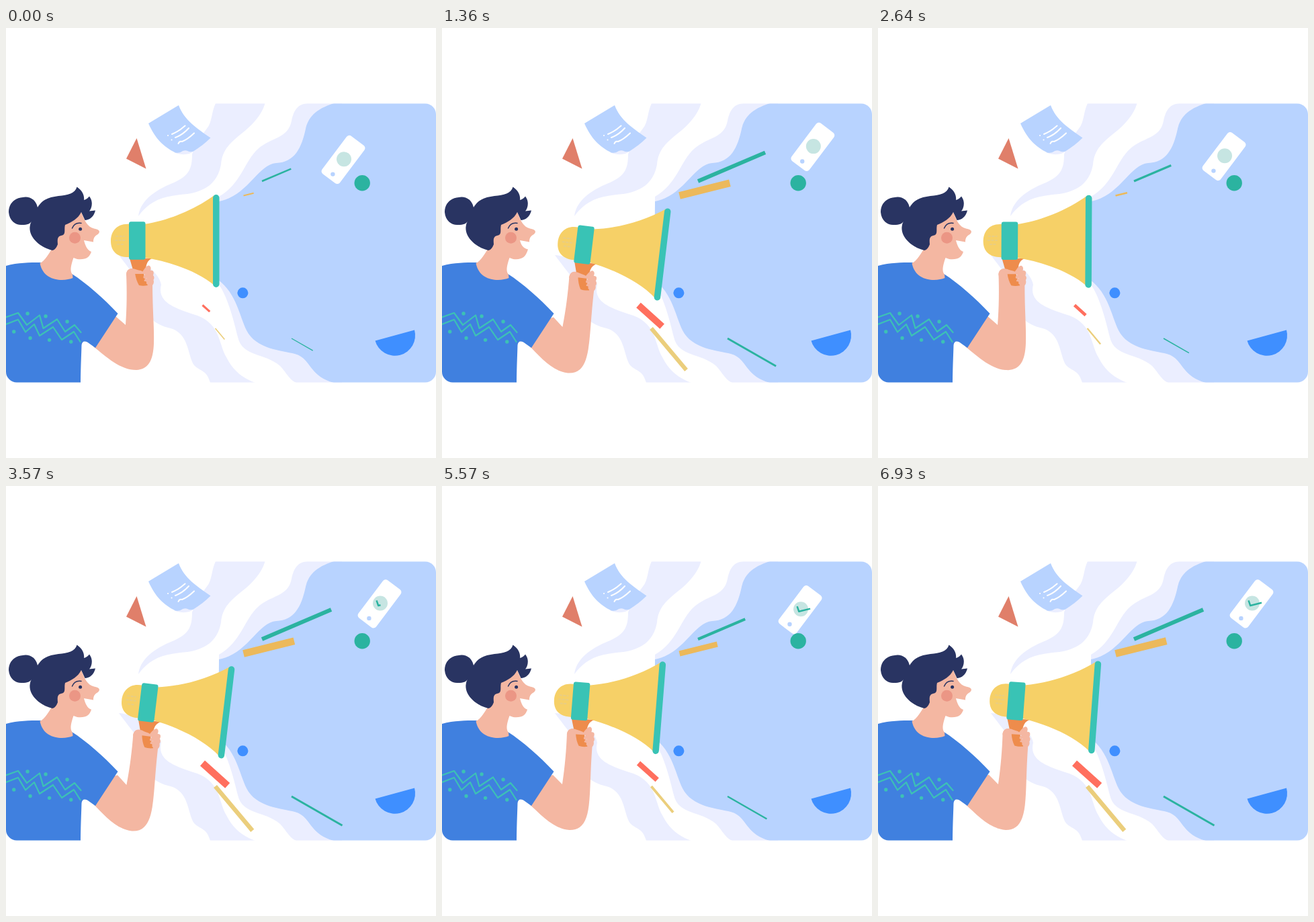
Recreate the animation shown at these times as an HTML page. Size 640 by 640 pixels, loop 7000 ms.

```html
<!DOCTYPE html>
<html lang="en">
<head>
<meta charset="utf-8">
<title>Announcement</title>
<style>
html, body { margin: 0; width: 100%; height: 100%; overflow: hidden; background: #fff; }
svg { display: block; width: 100vw; height: 100vh; }
.sky { fill: #b8d3ff; }
.mist { fill: #ebeeff; }
.skin { fill: #f4b7a2; }
.navy { fill: #293462; }
.teal { fill: #2bb3a0; }
.mint { fill: #39c3b5; }
.gold { fill: #f6d067; }
.grip { fill: #ee8c4c; }
.blue { fill: #3f8fff; }
.line { fill: none; stroke-linecap: round; stroke-linejoin: round; }
</style>
</head>
<body>
<svg viewBox="0 0 640 640">
  <clipPath id="card"><rect y="112.5" width="640" height="415" rx="16"/></clipPath>
  <g clip-path="url(#card)">
    <!-- sound waves -->
    <g class="mist">
      <path d="M312 112H385.5C383 122 375 138 352 156C335 170 322 180 320 203C315 232 295 243 270 247C240 250 218 252 197 280C200 255 225 240 250 230C272 220 277 210 277 188C285 165 296 155 302 145C307 135 306 125 312 112Z"/>
      <path d="M168 338C195 340 228 362 231 382C224 410 255 418 285 428C320 442 316 470 328 490C338 510 352 521 371 528H304C298 508 290 512 280 502C270 488 273 455 245 447C232 444 222 439 216 432C222 400 195 375 168 338Z"/>
      <path d="M448 112C432 114 428 125 425 138C420 165 395 162 375 180C355 198 350 232 317 251V382C331 402 340 440 345 460C352 490 385 483 408 503C418 514 422 524 432 528H500V112Z"/>
    </g>
    <path class="sky" d="M488 112C460 121 450 133 446 150C440 178 430 200 402 201C375 203 360 250 317 258L316 375C343 395 348 430 358 450C372 478 410 480 430 485C455 492 450 518 488 528H640V112Z"/>

    <!-- loose shapes -->
    <path class="mist" d="M250 185C262 190 272 189 280 183L262 180Z"/>
    <path class="sky" d="M212 142L257 115C265 137 285 150 304.5 163.5C297 171 288 178 279 183.5C271 186 270 180 263 183C259 186 256 186 252 185.5C235 177 222 165 212 142Z"/>
    <path class="line" stroke="#fff" stroke-width="2" d="M247 158Q257 154 266.5 145.5M252 163Q263 159 272 149M256.500 172Q258 168 262 169Q270 166 280 156.500M241 160h.1M246.500 166.500h.1"/>
    <path fill="#e07f6a" d="M194.500 164L179 194.500L208.500 209.500Z"/>
    <circle class="teal" cx="530.2" cy="230.700" r="11.700"/>
    <circle class="blue" cx="352.400" cy="394.300" r="8"/>
    <path class="blue" d="M549.500 465.500L608 449.500A30.300 30.300 0 0 1 549.500 465.500Z"/>
    <g id="streaks"></g>

    <g id="phone">
      <rect x="-16.500" y="-35.300" width="33" height="70.600" rx="5" fill="#fff" transform="rotate(37)"/>
      <circle cx="1" cy="-.8" r="11" fill="#c6e5e2"/>
      <circle cx="-15.600" cy="21.600" r="3.200" class="sky"/>
      <path id="tick" class="line" style="stroke-linecap:butt" stroke="#2bb3a0" stroke-width="2.500" pathLength="24" d="M-4.500 -5L-1.800 2.700L15 -1.500"/>
    </g>

    <!-- raised arm and megaphone -->
    <g id="arm">
      <path class="skin" d="M138 440L163 429L178 442C180 415 180 390 179 366C180 358 187 357 192 359L218 380C218 420 221 450 220 470C219 495 212 508 194 509C170 509 150 490 130 474Z"/>
      <path class="grip" d="M184 343L218 342.500C210 346 209 352 208 358L205 364L206 372L211 383C206 384 202 384 198 383C195 378 193 372 192 365L189 360Z"/>
      <path class="skin" d="M179 368C179 357 188 357 194 359.500C201 361.500 205 361 204 366L192 366L190 374Z"/>
      <path class="skin" d="M202 365C204 361 209 353 213 353.500C216 355 216 358 215 361C219 360 221 363 219 368C221 370 221 373 219.500 375C221 379 219 384 215 384L209 380.500Q208 379 212 377L206 377Q204 375 210 372L205 372.500Q203 370 207 367Z"/>
      <path class="gold" d="M185 292C165 290 156 303 156 317C156 333 166 342 185 341Z"/>
      <path class="line" stroke="#e8cd84" stroke-width="2" stroke-dasharray="2.500 3" d="M164 310H176M163 316H177M166 322H177"/>
      <path class="gold" d="M206 292C240 287 280 271 310 249V383C285 362 245 348 206 341.500Z"/>
      <rect class="mint" x="183" y="288.300" width="24.500" height="56.500" rx="3"/>
      <rect class="mint" x="308" y="248" width="9.500" height="138" rx="4.700"/>
    </g>

    <!-- speaker -->
    <path fill="#4080df" d="M0 354C18 349 35 349 51 349L98 366C120 380 145 402 166.500 425L133 476L121 467.500C116 465 113 467 112.500 472C112 490 111 510 111 528H0Z"/>
    <g stroke="#3cc1b5" stroke-width="2.200" class="line">
      <path d="M0 430.500L18 424L31 442L50 427.500L55.500 447L76 433.500L88 452L102 442L111.500 453"/>
      <path d="M0 441L18 434L29 452.500L42 441L50 458L70 445L83 464L101 452L110.500 467"/>
      <path stroke-width="5.300" d="M32 425h.1M59 429h.1M91 437h.1M11.700 452h.1M36 461.500h.1M64.500 464.300h.1M96.700 467h.1"/>
    </g>
    <path id="face" class="skin"/>
    <circle cx="102.500" cy="312.300" r="8.500" fill="#eb9685"/>
    <circle class="navy" cx="110.600" cy="299.300" r="2.500"/>
    <path class="line" stroke="#293462" stroke-width="1.500" d="M98.500 298C101 292 106 289.500 112 290.500"/>
    <path class="navy" d="M47 267C44 253 32 250 25 252C12 253 4 262 4 274C5 288 16 294 24 293C32 293 36 291 38 288C36 291 36 293 35.500 296C34 312 50 326 69 331C73 330 75 327 77 322C77 319 75 310 82 309C90 308 86 300 88 293C98 289 107 284 112 274L117.500 286C124 286 131 281 133 271.500L124 272.500C128 268 130 258 124 250.500C123 252 120 255 116 256C117 250 114 242 105.500 236.500C103 246 92 249 78 250C65 252 55 254 47 267Z"/>
  </g>
</svg>
<script>
const LOOP = 7000;
const $ = id => document.getElementById(id);
const clamp = v => Math.min(1, Math.max(0, v));

// Each start time begins a smooth swing to the opposite end (0 -> 1 -> 0 ...).
const swing = (t, starts, length = 1120) => starts.reduce((v, start, i) => {
  const p = (1 - Math.cos(Math.PI * clamp((t - start) / length))) / 2;
  return v + (i % 2 ? -p : p);
}, 0);

const streaks = [
  { x: 381, y: 228, angle: -23.1, len: 112, width: 6, min: .42, color: '#2bb3a0', starts: [40, 1200, 2310, 3594, 5046] },
  { x: 353.5, y: 249.5, angle: -14, len: 78, width: 11, min: .2, color: '#ecb95b', starts: [40, 1280, 2500, 3742, 4880] },
  { x: 292.5, y: 412.5, angle: 42, len: 50, width: 10.5, min: .29, color: '#ff6f5e', starts: [40, 1160, 2293, 3706, 4909] },
  { x: 311.5, y: 447, angle: 50, len: 86, width: 6.5, min: .25, color: '#ebce7c', starts: [40, 1160, 2367, 3776, 5046] },
  { x: 425, y: 462, angle: 29.8, len: 87, width: 3, min: .42, color: '#2bb3a0', starts: [40, 1160, 2367, 3706, 4932] }
];
for (const s of streaks) {
  s.el = document.createElementNS('http://www.w3.org/2000/svg', 'rect');
  const attrs = { y: -s.width / 2, width: s.len, height: s.width, fill: s.color };
  for (const name in attrs) s.el.setAttribute(name, attrs[name]);
  $('streaks').append(s.el);
}

function facePath(jaw) {
  const x = 127 + 1.8 * jaw, y = 333 - 6 * jaw;
  return `M112 274C117 287 121 296 131 298.5C140 300 141 304 136 307.5C131 310 130 314 130 318.500L116 316
    C118 324 121 ${y - 2} ${x} ${y}C124 342 119 345 106 344L100.500 342C96 355 95 362 99 367L99.500 372
    C88 377 56 379 50.500 350C58 347 64 335 69 328L80 292Z`;
}

function draw(now) {
  const t = now % LOOP;

  const lift = swing(t, [0, 1270, 2490, 3690, 4850, 6420], 1200);
  $('arm').setAttribute('transform', `rotate(${6.95 * lift} 153 455)`);

  const slide = swing(t, [40, 1160, 2275, 3729, 4957]);
  $('phone').setAttribute('transform', `translate(${502 + 54 * slide} ${196 - 20.7 * slide})`);
  const drawn = 24 * clamp((t - 3390) / 400);
  $('tick').setAttribute('stroke-dasharray', `${drawn} 60`);
  $('tick').setAttribute('visibility', drawn ? 'visible' : 'hidden');

  for (const s of streaks) {
    const scale = s.min + (1 - s.min) * swing(t, s.starts);
    s.el.setAttribute('transform', `translate(${s.x} ${s.y}) rotate(${s.angle}) scale(${scale})`);
  }

  // The mouth moves twice in the first part of each half loop.
  const talk = t % (LOOP / 2);
  $('face').setAttribute('d', facePath(talk < 2140 ? Math.sin(Math.PI * talk / 1070) ** 2 : 0));
  requestAnimationFrame(draw);
}
requestAnimationFrame(draw);
</script>
</body>
</html>
```
